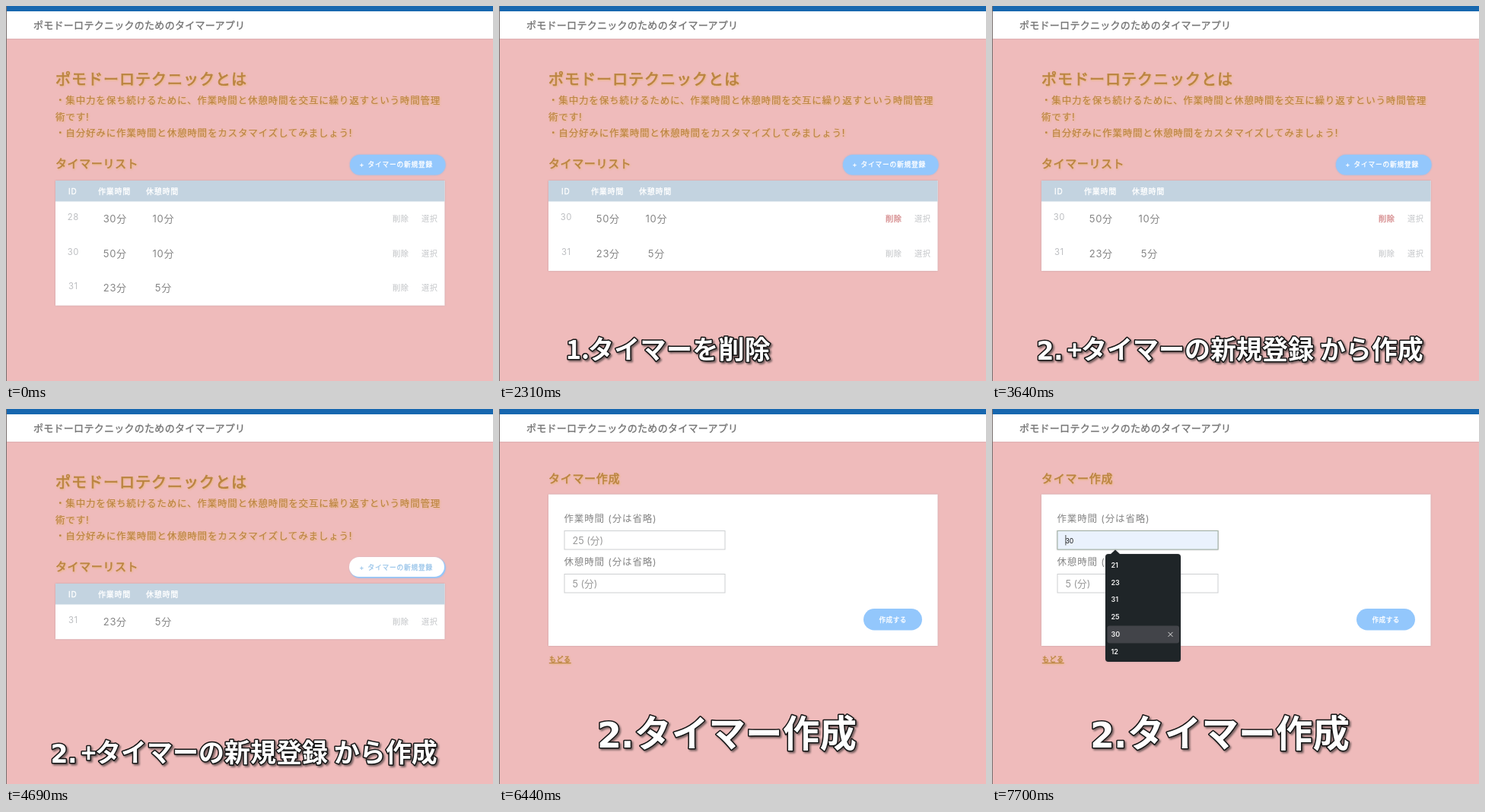
Write an HTML page that moves like this. It is 640 px wide and 494 px high and loops after 8 s.

```html
<!DOCTYPE html>
<html lang="ja">
<head>
<meta charset="utf-8">
<title>タイマーアプリ</title>
<style>
html, body { margin: 0; width: 100%; height: 100%; overflow: hidden; background: #efbbbb; }
svg { display: block; font-family: Inter, "Noto Sans CJK JP", sans-serif; white-space: pre; }
.gold { filter: drop-shadow(1.5px 1.5px 1px rgba(232, 178, 84, .6)); }
.card { filter: drop-shadow(0 .5px 1.2px rgba(120, 115, 125, .35)); }
.pill { filter: drop-shadow(0 .5px 1.2px rgba(125, 185, 242, .8)); }
.caption { font-family: "Noto Sans CJK JP", sans-serif; font-weight: 700; fill: #fff; stroke: #151515;
  stroke-width: 3px; stroke-linejoin: round; paint-order: stroke;
  filter: drop-shadow(2px 2px .8px rgba(70, 60, 60, .7)); }
.digit { font-family: "DejaVu Sans", sans-serif; }
.menu { font-weight: 600; }
</style>
</head>
<body>
<svg id="stage" width="640" height="494" viewBox="0 0 640 494"></svg>
<script>
const LOOP = 8000;
const FIRST_DELETE = 2240, SECOND_DELETE = 4130, FORM_OPEN = 5390, MENU_OPEN = 7000, MENU_HOVER = 7350;
const TIMERS = [[28, 30, 10], [30, 50, 10], [31, 23, 5]];
const OPTIONS = [21, 23, 31, 25, 30, 12];
const BLUE = '#93c7fc', GRAY = '#858585', PALE = '#c3c5c8', GOLD = '#ba8440';

const stage = document.getElementById('stage');
const ramp = (t, from, to) => Math.max(0, Math.min(1, (t - from) / (to - from)));

const text = (x, y, size, spacing, fill, content, extra = '') =>
  `<text x="${x}" y="${y}" font-size="${size}" letter-spacing="${spacing}" ${fill && `fill="${fill}"`} ${extra}>${content}</text>`;
const rect = (x, y, w, h, fill, extra = '') =>
  `<rect x="${x}" y="${y}" width="${w}" height="${h}" fill="${fill}" ${extra}/>`;
// A thin stroke in the text colour gives weights between regular and bold.
const heavy = (x, y, size, spacing, fill, content, width = .3, extra = '') =>
  text(x, y, size, spacing, fill, content, `stroke="${fill}" stroke-width="${width}" ${extra}`);
const gold = (x, y, size, spacing, content, width = .15) =>
  heavy(x, y, size, spacing, GOLD, content, width, 'class="gold"');

function frame() {
  return rect(0, 0, 640, 494, '#efbbbb') +
    rect(0, 7, 640, 36, '#fff', 'class="card"') +
    rect(0, 0, 640, 7, '#1767af') +
    rect(0, 0, 1, 494, '#77706f') +
    heavy(36, 30, 13, .28, '#757575', 'ポモドーロテクニックのためのタイマーアプリ', .35);
}

function newTimerButton(hover) {
  const label = fill =>
    heavy(464.5, 212.3, 8.7, .8, fill, '+') +
    heavy(475.5, 212.3, 8.7, .8, fill, 'タイマーの新規登録');
  return `<g class="pill">${rect(452, 196, 125.5, 26.5, BLUE, 'rx="13.2"')}</g>` +
    label('#fff') +
    `<g opacity="${hover}">${rect(451, 195, 125, 26, '#fff', 'rx="13"')}${label('#9cc6ea')}</g>`;
}

function timerRow([id, work, rest], i, hover) {
  const y = i * 45.7;
  const middle = 'text-anchor="middle"';
  return text(88.3, 282 + y, 11.3, .5, '#bdbfc2', id, middle) +
    text(143.3, 284.8 + y, 13, .7, GRAY, work + '分', middle) +
    text(206.8, 284.8 + y, 13, .7, GRAY, rest + '分', middle) +
    heavy(508, 283.8 + y, 10.2, .5, hover ? '#d68d8f' : PALE, '削除', hover ? .35 : .1) +
    text(546, 283.8 + y, 10.2, .5, PALE, '選択');
}

function listPage(t) {
  const rows = TIMERS.slice((t >= FIRST_DELETE) + (t >= SECOND_DELETE));
  const deleteHover = t >= 1680 && t < 4340;
  const head = (x, s) => heavy(x, 248, 10, .75, '#fff', s);
  return gold(65, 103.5, 20, 1, 'ポモドーロテクニックとは', .7) +
    gold(65, 129.2, 12.5, .83, '・集中力を保ち続けるために、作業時間と休憩時間を交互に繰り返すという時間管理') +
    gold(65, 150.7, 12.5, .83, '術です!') +
    gold(65, 172.2, 12.5, .83, '・自分好みに作業時間と休憩時間をカスタマイズしてみましょう!') +
    gold(65, 213.2, 15, .6, 'タイマーリスト', .55) +
    newTimerButton(ramp(t, 4410, 4620)) +
    `<g class="card">${rect(65, 230, 511.5, 27.5 + rows.length * 45.7, '#fff')}</g>` +
    rect(65, 230, 511.5, 27.5, '#c3d3e0') +
    head(82, 'ID') + head(121, '作業時間') + head(184, '休憩時間') +
    rows.map((row, i) => timerRow(row, i, deleteHover && i === 0)).join('');
}

function field(y, label, placeholder) {
  return text(85.5, y - 11, 12.5, .85, GRAY, label) +
    rect(86, y + .5, 211, 24.5, '#fff', 'stroke="#cdcfd1"') +
    text(96.5, y + 17.6, 12.6, 0, '#999', placeholder);
}

function focusedField(choice) {
  const filled = choice >= 0;
  return rect(86, 160.5, 211, 24.5, filled ? '#eaf2fd' : '#fff', 'stroke="#a3b3a5" class="card"') +
    (filled ? text(96.5, 177.3, 8.6, 0, '#111', OPTIONS[choice])
            : text(96.5, 177.6, 12.6, 0, '#999', '25 (分)')) +
    rect(96.5, 166, .8, 13.5, '#222');
}

function menu(choice) {
  const items = OPTIONS.map((n, i) => {
    const y = 205.3 + i * 22.9;
    const mark = i === choice
      ? rect(151.5, y - 11.5, 94.5, 23, '#424449', 'rx="3"') +
        `<path d="M231.5 ${y - 3}l6 6m0-6l-6 6" stroke="#ddd"/>` : '';
    return mark + text(156.5, y + 3.3, 9, 0, '#f2f2f2', n, 'class="menu"');
  });
  return `<g class="card">${rect(149, 191, 99, 142, '#1f2528', 'rx="4"')}<path d="M155.5 191.5l6.5-6 6.5 6z" fill="#1f2528"/></g>` +
    items.join('');
}

function formPage(t) {
  const open = t >= MENU_OPEN;
  const choice = t < MENU_HOVER ? -1 : Math.min(4, Math.floor((t - MENU_HOVER) / 70));
  return gold(65, 97, 15, .7, 'タイマー作成', .55) +
    `<g class="card">${rect(65, 112.5, 511.5, 199.5, '#fff')}</g>` +
    field(160, '作業時間 (分は省略)', '25 (分)') +
    field(217, '休憩時間 (分は省略)', '5 (分)') +
    rect(479, 263, 77, 28.5, BLUE, 'rx="14.2"') +
    heavy(499.5, 280.7, 8.6, .5, '#fff', '作成する') +
    gold(66, 333.2, 8.8, .8, '<tspan text-decoration="underline">もどる</tspan>', .35) +
    (open ? focusedField(choice) + menu(choice) : '');
}

const caption = (opacity, content) => opacity ? `<g class="caption" opacity="${opacity}">${content}</g>` : '';

function captions(t) {
  return caption(ramp(t, 70, 350) * (1 - ramp(t, 3150, 3360)),
      text(88, 465, 34, 0, '', '1.') + text(117, 465, 34, .3, '', 'タイマーを削除')) +
    caption(ramp(t, 3290, 3570) * (1 - ramp(t, 5390, 5600)),
      text(58.5, 465.5, 33, -.5, '', '2.', 'class="digit"') +
      text(98.5, 466, 34, 0, '', '+') +
      text(117, 465, 34, 0, '', 'タイマーの新規登録 から作成')) +
    caption(ramp(t, 5530, 5740),
      text(129, 445.5, 46, -1, '', '2.', 'class="digit"') +
      text(178, 444.5, 48.5, .2, '', 'タイマー作成'));
}

function draw(now) {
  const t = now % LOOP;
  stage.innerHTML = frame() + (t < FORM_OPEN ? listPage(t) : formPage(t)) + captions(t);
  requestAnimationFrame(draw);
}
draw(performance.now());
</script>
</body>
</html>
```
